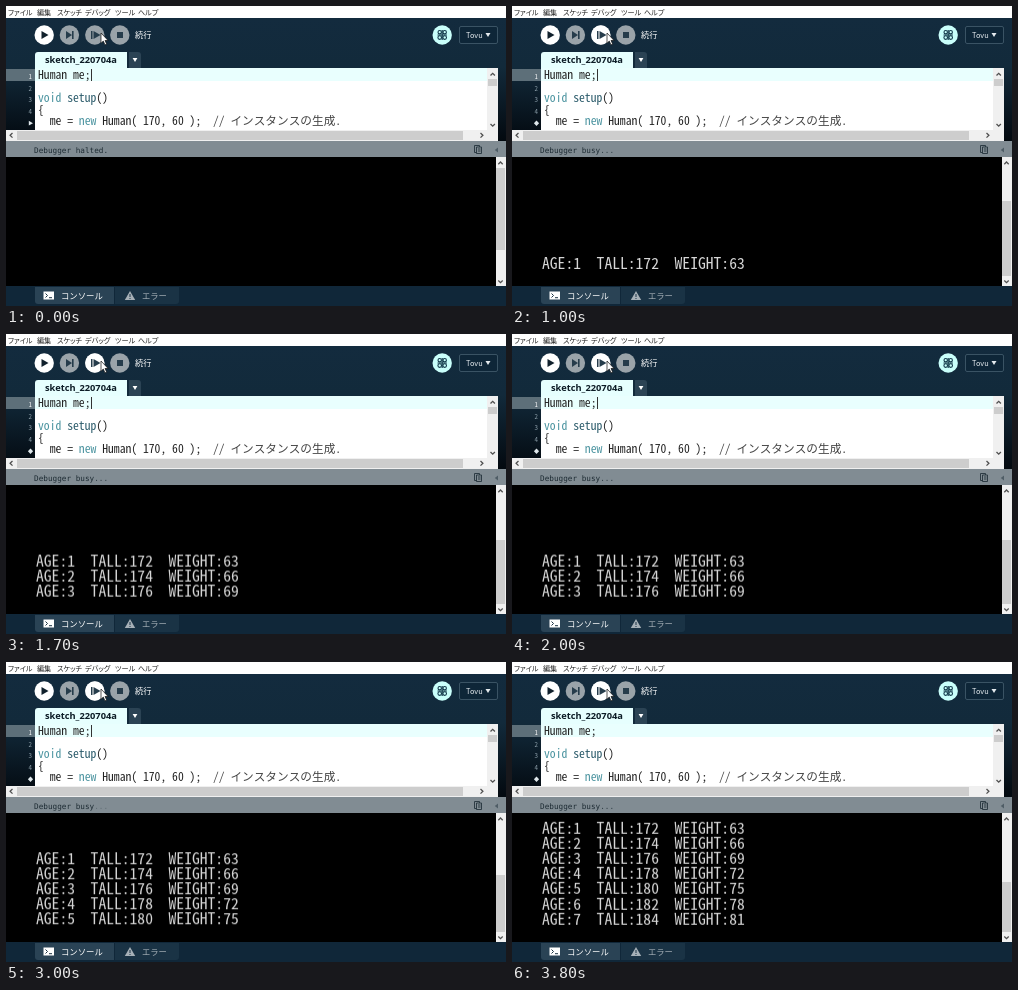
Recreate the animation shown at these times as an HTML page. Size 500 by 300 pixels, loop 4000 ms.

```html
<!DOCTYPE html>
<html lang="ja">
<head>
<meta charset="utf-8">
<title>Debugger</title>
<style>
html, body { margin: 0; width: 100%; height: 100%; overflow: hidden; background: #0b2033; }
svg { display: block; width: 500px; height: 300px; }
text { white-space: pre; font-family: "Noto Sans CJK JP", "Noto Sans CJK", sans-serif; }
.mono text { font-family: "Noto Sans Mono CJK JP", "Noto Sans Mono CJK", "Noto Sans CJK JP", monospace; }
.menu { font-size: 7.1px; fill: #222; }
.menu text { font-feature-settings: "palt"; }
.code { font-size: 11.67px; fill: #222; }
.key { fill: #4a939f; }
.fn { fill: #2a5a6a; }
.note { fill: #444; }
.num { font-size: 6.2px; fill: #93a5b0; text-anchor: end; }
.status text { font: 7.7px "DejaVu Sans Mono", monospace; fill: #1d2b33; }
.out { font-size: 15.6px; fill: #d6d6d6; }
.caret, .halted, .busy, .dots, .rows, .idle, .thumb { animation: 4s step-end infinite; }
.caret { animation-name: blink; }
.halted { animation-name: halted; }
.busy { animation-name: busy; }
.dots { animation-name: dots; }
.idle { animation-name: idle; }
.rows { animation-name: rows; }
.thumb { animation-name: thumb; }
@keyframes blink {
  0%, 12.5%, 25%, 37.5%, 50%, 62.5%, 75%, 87.5% { opacity: 1; }
  5%, 20%, 30%, 45%, 55%, 70%, 82.5%, 95%, 100% { opacity: 0; }
}
@keyframes halted { 0% { opacity: 1; } 12.5%, 100% { opacity: 0; } }
@keyframes busy { 0% { opacity: 0; } 12.5%, 100% { opacity: 1; } }
@keyframes dots {
  0%, 17.5%, 77.5%, 100% { opacity: .8; }
  15%, 75% { opacity: .3; }
}
@keyframes idle { 0% { opacity: 1; } 15%, 100% { opacity: 0; } }
@keyframes rows {
  0% { transform: translateY(20px); }
  15% { transform: translateY(0); }
  27.5% { transform: translateY(-15.2px); }
  40% { transform: translateY(-30.4px); }
  57.5% { transform: translateY(-45.6px); }
  70% { transform: translateY(-60.8px); }
  77.5% { transform: translateY(-76px); }
  90%, 100% { transform: translateY(-91.2px); }
}
@keyframes thumb {
  0% { transform: translateY(90px); }
  15% { transform: translateY(0); }
  27.5% { transform: translateY(6px); }
  40% { transform: translateY(11px); }
  57.5% { transform: translateY(15px); }
  70% { transform: translateY(18px); }
  77.5% { transform: translateY(22px); }
  90%, 100% { transform: translateY(25px); }
}
</style>
</head>
<body>
<svg viewBox="0 0 500 300">
  <defs>
    <linearGradient id="bar" x2="0" y2="1">
      <stop stop-color="#132b3e"/><stop offset=".4" stop-color="#122a3b"/><stop offset="1" stop-color="#03090f"/>
    </linearGradient>
    <clipPath id="console"><rect y="151" width="490" height="114"/></clipPath>
    <clipPath id="track"><rect x="490" y="160" width="10" height="110"/></clipPath>
  </defs>
  <rect width="500" height="300" fill="#102739"/>
  <rect y="11" width="500" height="124" fill="url(#bar)"/>

  <rect width="500" height="12" fill="#fff"/>
  <g class="menu">
    <text x="2" y="8.5">ファイル</text><text x="31" y="8.5">編集</text>
    <text x="51" y="8.5">スケッチ</text><text x="79" y="8.5">デバッグ</text>
    <text x="109" y="8.5">ツール</text><text x="132" y="8.5">ヘルプ</text>
  </g>

  <!-- toolbar -->
  <circle cx="38.2" cy="29" r="9.7" fill="#fff"/>
  <path d="M35.5 25l7 4-7 4z" fill="#10202c"/>
  <g fill="#9aa3a9">
    <circle cx="63.4" cy="29" r="9.7"/><circle cx="88.8" cy="29" r="9.7"/><circle cx="113.8" cy="29" r="9.7"/>
  </g>
  <circle class="busy" cx="88.8" cy="29" r="9.7" fill="#fff"/>
  <g fill="#263c4b">
    <path d="M60 25l6 4-6 4zM66 25h1.6v8H66z"/>
    <path d="M85 25h1.5v8H85zM87.5 25l7 4-7 4z"/>
    <path d="M111 26h6v6h-6z"/>
  </g>
  <text x="129" y="32" font-size="8.2" fill="#fff">続行</text>
  <path d="M95 27v10.2l2.3-2.1 1.7 3.8 1.7-.8-1.7-3.6h3.1z" fill="#fff" stroke="#111" stroke-width=".7"/>

  <circle cx="436.2" cy="29" r="9.7" fill="#c9fffb"/>
  <g fill="none" stroke="#12384a" stroke-width="1.1">
    <circle cx="433.7" cy="26.2" r="1.7"/><circle cx="438.7" cy="26.2" r="1.7"/>
    <circle cx="433.7" cy="31.6" r="1.8"/><circle cx="438.7" cy="31.6" r="1.8"/>
    <path d="M436.2 24v10M431.5 29h9.4"/>
  </g>
  <rect x="453.5" y="20.5" width="38" height="17" rx="1.5" fill="#0e2638" stroke="#3a5364"/>
  <text x="460" y="31.5" font-size="7.4" fill="#e4eaee">Tovu</text>
  <path d="M479.5 27h5l-2.5 4z" fill="#e4eaee"/>

  <!-- sketch tab -->
  <path d="M29 63V49q0-3 3-3h89v17z" fill="#e6fffe"/>
  <text x="39" y="56.5" font-size="9.3" font-weight="700" fill="#0c1c26" style="font-family:'Open Sans',sans-serif">sketch_220704a</text>
  <path d="M123 46h9q3 0 3 3v13h-12z" fill="#2b4354"/>
  <path d="M126.6 52h4.8l-2.4 4z" fill="#fff"/>

  <!-- editor -->
  <rect x="29" y="62" width="463" height="73" fill="#fff"/>
  <rect x="29" y="62" width="453" height="13" fill="#e9fffe"/>
  <rect y="63" width="29" height="12" fill="#5d6f79"/>
  <g class="num">
    <text x="26" y="72.8" fill="#fff">1</text><text x="26" y="84.6">2</text>
    <text x="26" y="96.2">3</text><text x="26" y="107.8">4</text>
  </g>
  <path class="halted" d="M22.8 114.8l4.2 2.4-4.2 2.4z" fill="#dfe7eb"/>
  <path class="busy" d="M24.5 114.5l2.6 2.7-2.6 2.7-2.6-2.7z" fill="#dfe7eb"/>
  <g class="mono code">
    <text x="32" y="72.6">Human me;</text>
    <text x="32" y="96"><tspan class="key">void</tspan> <tspan class="fn">setup</tspan>()</text>
    <text x="32" y="108">{</text>
    <text x="32" y="119.3">  me = <tspan class="key">new</tspan> Human( 170, 60 );  <tspan class="note">// インスタンスの生成.</tspan></text>
  </g>
  <rect class="caret" x="85" y="63" width="1" height="12" fill="#333"/>

  <rect x="481" y="62" width="11" height="62" fill="#f0f0f0"/>
  <rect x="482" y="73" width="9" height="7" fill="#cdcdcd"/>
  <rect y="124" width="492" height="11" fill="#f0f0f0"/>
  <rect x="11" y="125" width="446" height="9" fill="#cdcdcd"/>
  <g fill="none" stroke="#505050" stroke-width="1.3">
    <path d="M484.5 69.5l2.2-2.2 2.2 2.2M484.5 118l2.2 2.2 2.2-2.2"/>
    <path d="M6.5 127l-2.4 2.3 2.4 2.3M474.5 127l2.4 2.3-2.4 2.3"/>
  </g>

  <!-- status bar -->
  <rect y="135" width="500" height="16" fill="#818c93"/>
  <g class="status">
    <text class="halted" x="28" y="147">Debugger halted.</text>
    <g class="busy">
      <text x="28" y="147">Debugger busy</text>
      <text class="dots" x="88.2" y="147">...</text>
    </g>
  </g>
  <g fill="none" stroke="#25343d" stroke-width=".9">
    <path d="M470.5 146.5h-2v-7h5v1.5M470.5 141h5v6.5h-5zM472 143h2.5M472 145h2.5"/>
  </g>
  <path d="M492 141.5v5l-3.2-2.5z" fill="#4f5d66"/>

  <!-- console -->
  <rect y="151" width="490" height="129" fill="#000"/>
  <g clip-path="url(#console)"><g id="rows" class="rows mono out"></g></g>
  <rect x="490" y="151" width="10" height="129" fill="#f0f0f0"/>
  <rect class="idle" x="490" y="162" width="9" height="82" fill="#cdcdcd"/>
  <g clip-path="url(#track)"><rect class="thumb" x="490" y="195" width="9" height="100" fill="#cdcdcd"/></g>
  <path d="M492.3 158.2l2.2-2.2 2.2 2.2M492.3 274.5l2.2 2.2 2.2-2.2" fill="none" stroke="#505050" stroke-width="1.3"/>

  <!-- footer tabs -->
  <path d="M29 281h79v17h-76q-3 0-3-3z" fill="#2a4355"/>
  <path d="M109 281h64v14q0 3-3 3h-61z" fill="#1a3345"/>
  <rect x="37.5" y="285.5" width="10.5" height="8" fill="#fff"/>
  <path d="M39.5 287.5l2 2-2 2M43 291.7h3" fill="none" stroke="#1c3343"/>
  <text x="55" y="293" font-size="8.4" font-weight="500" fill="#fff">コンソール</text>
  <path d="M124 285l5.2 9h-10.4z" fill="#a6b0b7"/>
  <path d="M124 288v3M124 292v1" stroke="#1a3345"/>
  <text x="136" y="293" font-size="8.3" fill="#a6b0b7">エラー</text>
</svg>
<script>
const rows = document.getElementById("rows");
for (let age = 1; age <= 7; age++) {
  const row = document.createElementNS(rows.namespaceURI, "text");
  row.setAttribute("x", 30);
  row.setAttribute("y", 262.6 + (age - 1) * 15.2);
  row.textContent = `AGE:${age}  TALL:${170 + 2 * age}  WEIGHT:${60 + 3 * age}`;
  rows.append(row);
}
</script>
</body>
</html>
```
